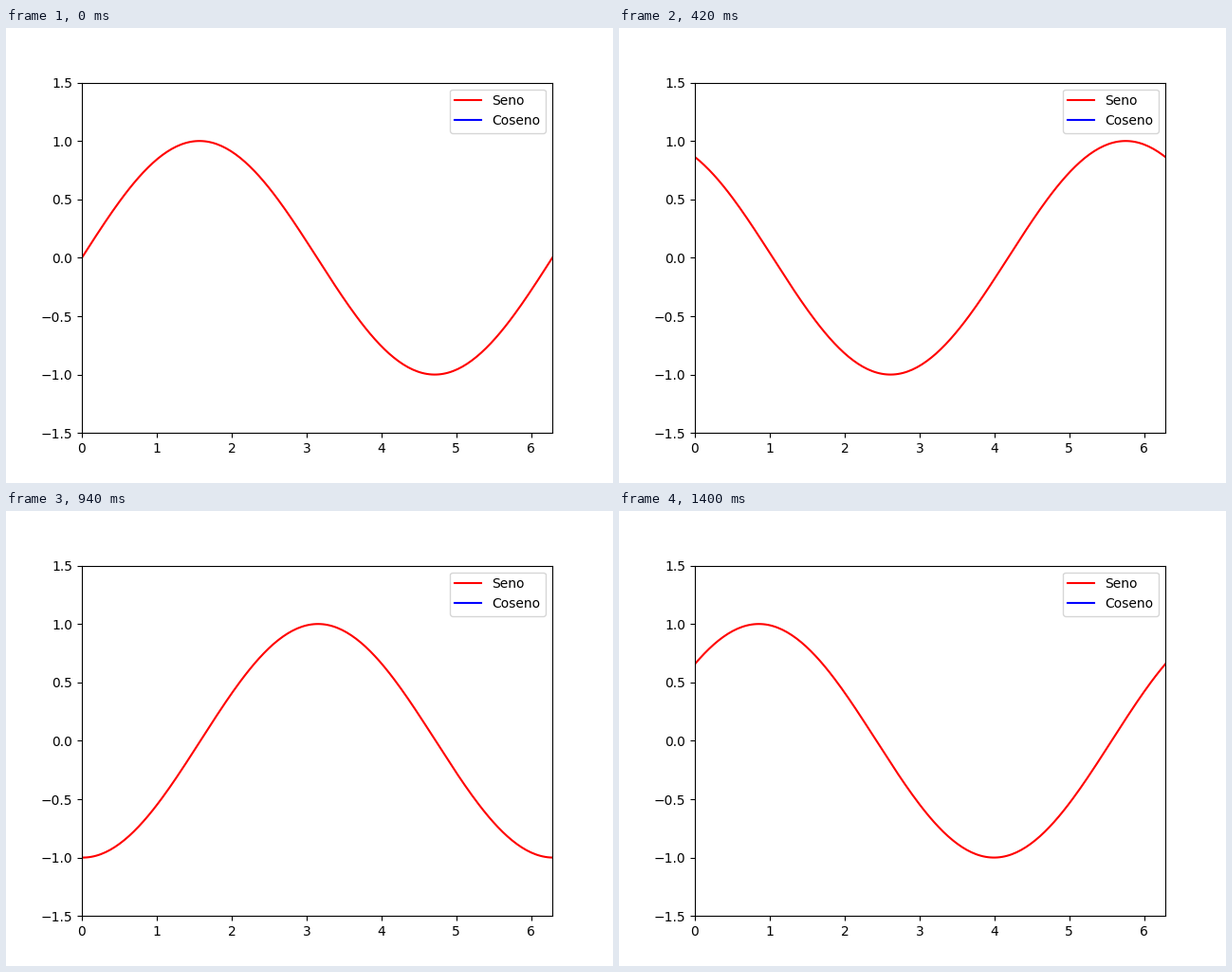
Write a matplotlib script that moves like this. It is 640 px wide and 480 px high and loops after 1.42 s.

```python
import numpy as np
import matplotlib.pyplot as plt
from matplotlib.animation import FuncAnimation

FRAMES = 71
INTERVAL = 20  # ms
PHASE_STEP = 0.1  # radians per frame

fig, ax = plt.subplots(figsize=(6.4, 4.8), dpi=100)
ax.set_xlim(0, 2 * np.pi)
ax.set_ylim(-1.5, 1.5)

x = np.linspace(0, 2 * np.pi, 200)
sine, = ax.plot([], [], color="red", label="Seno")
ax.plot([], [], color="blue", label="Coseno")  # legend entry only
ax.legend(loc="upper right")


def update(frame):
    sine.set_data(x, np.sin(x + PHASE_STEP * frame))
    return sine,


anim = FuncAnimation(fig, update, frames=FRAMES, interval=INTERVAL,
                     repeat=True, repeat_delay=0)
plt.show()
```
